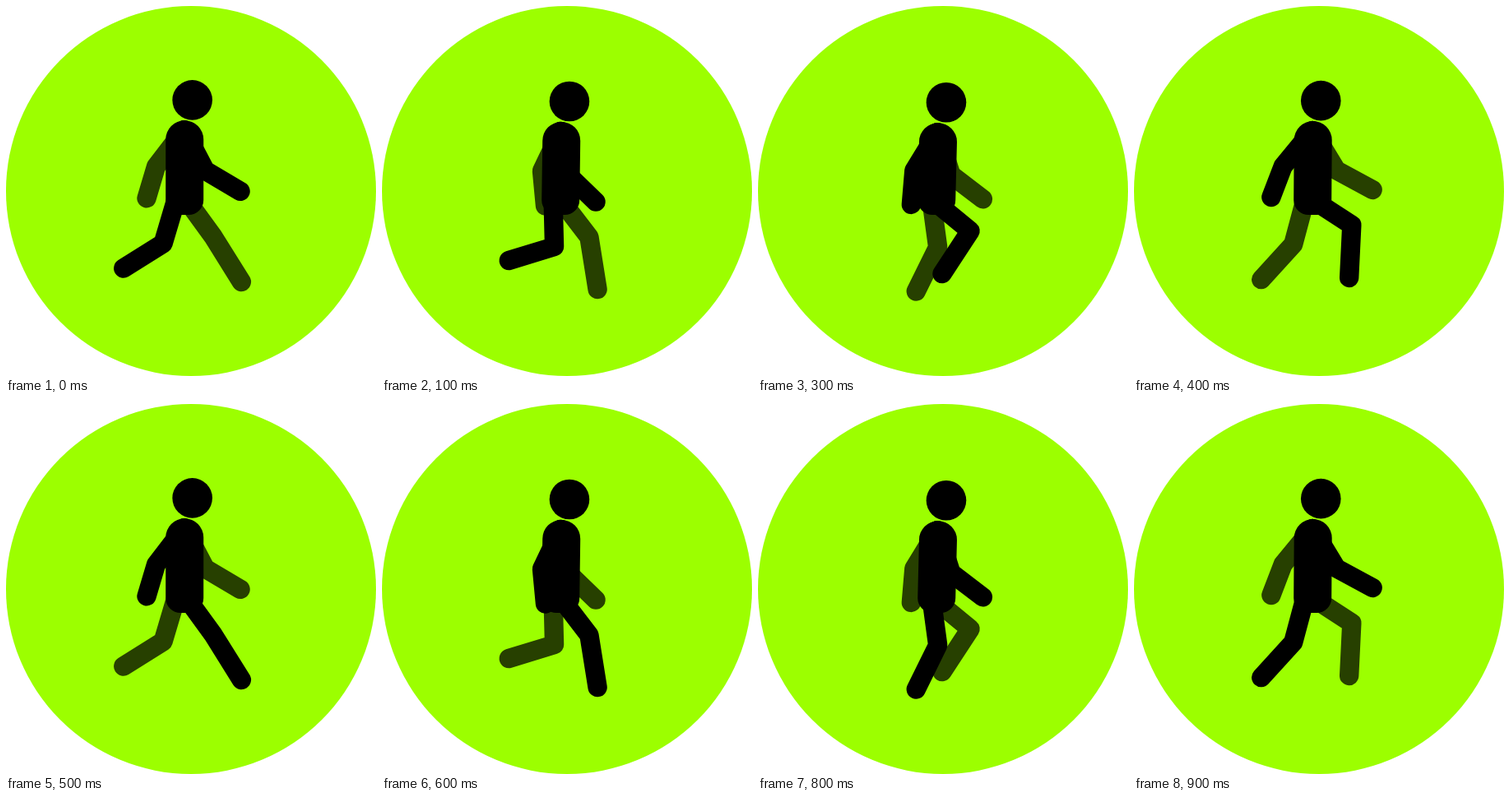
Animation, 450 px wide and 450 px high, one loop 1 s. Source, as an HTML page:

```html
<!DOCTYPE html>
<html lang="en">
<head>
<meta charset="utf-8">
<title>Walking figure</title>
<style>
  html, body { margin: 0; width: 100%; height: 100%; overflow: hidden; background: #fff; }
  svg { display: block; width: 100%; height: 100%; }
  .limb { fill: none; stroke-width: 23.4; stroke-linecap: round; stroke-linejoin: round; }
  .far { stroke: #274000; }
  .near { stroke: #000; }
</style>
</head>
<body>
<svg viewBox="0 0 450 450">
  <circle cx="225" cy="225" r="225" fill="#9cff00"/>
  <path id="farArm" class="limb far"/>
  <path id="farLeg" class="limb far"/>
  <path id="body"/>
  <path id="nearLeg" class="limb near"/>
  <path id="nearArm" class="limb near"/>
  <circle id="head" r="24.3"/>
</svg>
<script>
const STEP = 100, STEPS = 10, HALF = STEPS / 2;

// Key poses of the leg: [step, angle, easing power on the way there]
const thighKeys = [[0, -16.5], [3, 50.5, 1.2], [4, 57, 1], [5, 36, 1], [6, 37.5, 1], [9, -15, 1.4], [10, -16.5, 1]];
const shinKeys = [[1, -73], [5, 32, 1.4], [11, -73, 0.85]];

const [farArm, farLeg, body, nearLeg, nearArm, head] =
  ["farArm", "farLeg", "body", "nearLeg", "nearArm", "head"].map(id => document.getElementById(id));

const turn = (step, peak) => (step - peak) * 2 * Math.PI / STEPS;

function between(keys, step) {
  const first = keys[0][0];
  const t = (step - first + STEPS) % STEPS + first;
  const i = keys.findIndex(key => key[0] > t);
  const [t0, v0] = keys[i - 1], [t1, v1, power] = keys[i];
  return v0 + (v1 - v0) * ((t - t0) / (t1 - t0)) ** power;
}

// Angles are in degrees from straight down, positive towards the front
function drawLimb(node, x, y, ...bones) {
  let d = `M${x} ${y}`;
  for (const [angle, length] of bones) {
    const a = angle * Math.PI / 180;
    d += `l${length * Math.sin(a)} ${length * Math.cos(a)}`;
  }
  node.setAttribute("d", d);
}

function drawArm(node, step, x, y) {
  const u = turn(step, 9.3);
  const swing = Math.cos(u), bounce = Math.cos(2 * u);
  drawLimb(node, x, y,
    [-6.7 + 36 * swing + 2.8 * bounce, 54.5 + 2 * bounce],
    [23.7 + 42 * swing - 3.6 * bounce, 45 + 5 * swing]);
}

function drawLeg(node, step, y) {
  const swing = Math.cos(turn(step, 5));
  drawLimb(node, 213 + 6 * swing, y,
    [between(thighKeys, step), 56],
    [between(shinKeys, step), 61 + 4 * swing]);
}

function draw(ms) {
  const near = Math.floor(ms / STEP) % STEPS;
  const far = (near + HALF) % STEPS;
  const bob = 1.8 + 1.8 * Math.cos(2 * turn(near, 2.3));
  const x = 217.2 + bob * 0.6, y = 162.2 + bob;

  head.setAttribute("cx", 226.6 + bob * 0.8);
  head.setAttribute("cy", 114.3 + bob);
  body.setAttribute("d", `M${x - 23} ${y}A23 23 0 0 1 ${x + 23} ${y}
    L240.2 236A18 18 0 0 1 222.2 254H212.2A18 18 0 0 1 194.2 236Z`);

  drawArm(nearArm, near, x - 0.7, y - 11.5);
  drawArm(farArm, far, x - 0.7, y - 11.5);
  drawLeg(nearLeg, near, 235 + bob);
  drawLeg(farLeg, far, 235 + bob);
}

const start = performance.now();
function tick() {
  draw(performance.now() - start);
  requestAnimationFrame(tick);
}
tick();
</script>
</body>
</html>
```
